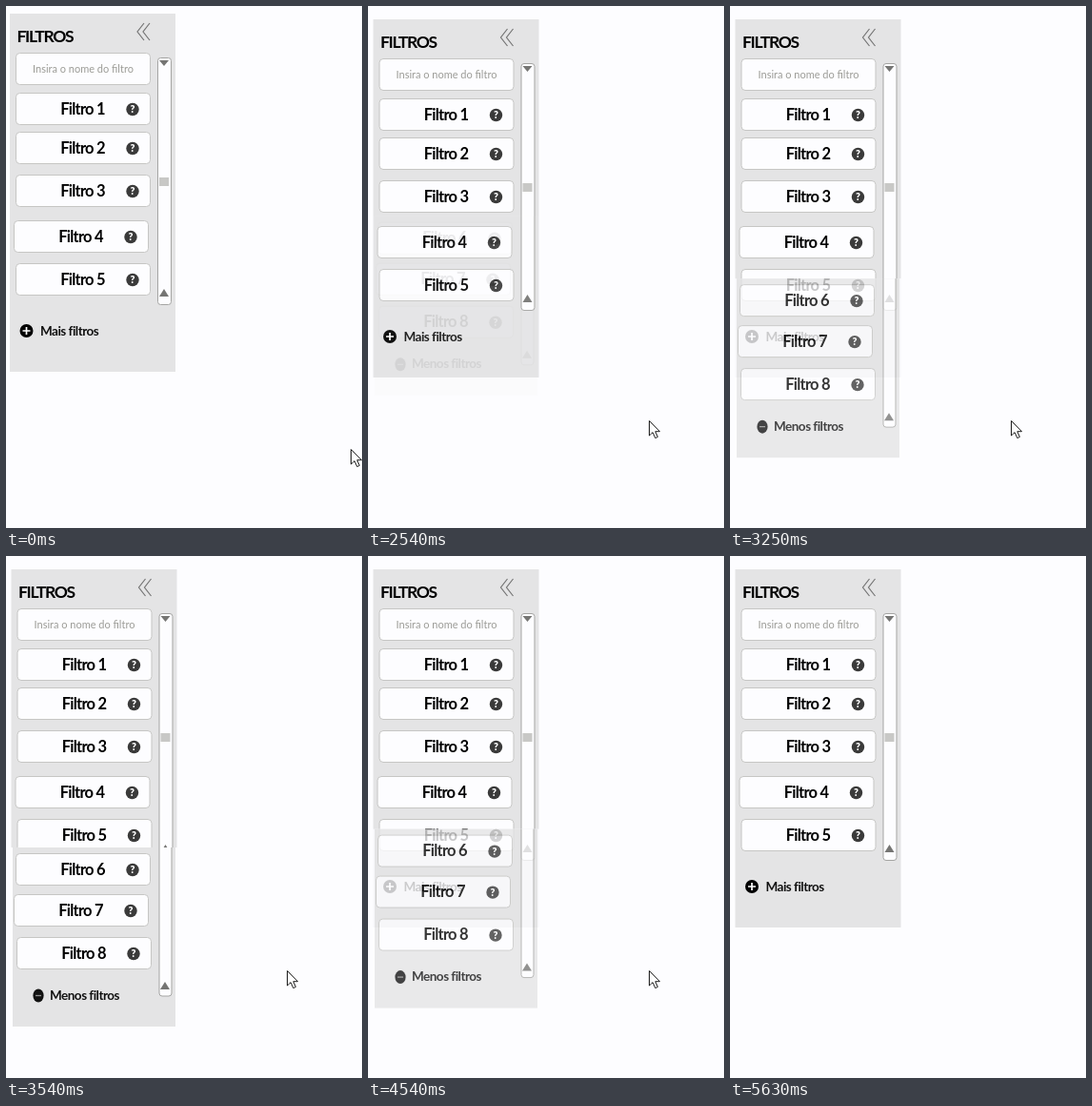
An HTML page for the animation above (7.04 s loop, 374 by 548 pixels).

```html
<!DOCTYPE html>
<html lang="pt">
<head>
<meta charset="utf-8">
<style>
  html, body { margin: 0; width: 100%; height: 100%; overflow: hidden; background: #fdfdff; }
  svg { display: block; width: 374px; height: 548px; font-family: Lato, "Open Sans", sans-serif; }
  text { font-weight: 700; }
  .paper { fill: #fdfdff; }
  .panel { fill: #e4e4e5; }
  .box { fill: #fdfdff; stroke: #c6c6c4; }
  .label { font-size: 16.5px; letter-spacing: -.75px; text-anchor: middle; }
  .title { font-size: 17.5px; letter-spacing: -1.3px; }
  .hint { font-weight: 400; font-size: 11px; fill: #9b9b96; }
  .link { font-size: 13.5px; letter-spacing: -.5px; fill: #111; }
  .help { fill: #3a3a3a; }
  .mark { font-weight: 900; font-size: 10.5px; fill: #fff; text-anchor: middle; }
  .bar { fill: #fdfdff; stroke: #a5a5a3; }
  .arrow { fill: #757573; }
  .chevron { fill: none; stroke: #757575; stroke-width: 1.2; }
</style>
</head>
<body>
<svg viewBox="0 0 374 548">
  <g id="main">
    <rect class="panel" x="4" y="8" width="174" height="376"/>
    <text class="title" x="11.5" y="37.5">FILTROS</text>
    <path class="chevron" d="M145 18l-7 9 7 9M151 18l-7 9 7 9"/>
    <rect class="box" x="10.5" y="49.5" width="141" height="33" rx="4"/>
    <text class="hint" x="28" y="70">Insira o nome do filtro</text>
    <rect class="bar" x="159.5" y="54.5" width="14" height="259" rx="3"/>
    <path class="arrow" d="M161 57h10l-5 6zM161 305h10l-5-8z"/>
    <rect x="161" y="180" width="10" height="9" fill="#c8c8c6"/>
    <circle cx="21.5" cy="341" r="7"/>
    <path d="M17.5 341h8m-4-4v8" stroke="#fff" stroke-width="1.7"/>
    <text class="link" x="36" y="345.5">Mais filtros</text>
  </g>
  <g id="extra">
    <rect class="paper" x="4" y="306" width="177" height="190"/>
    <rect class="panel" x="7" y="306" width="171" height="188"/>
    <path class="bar" d="M161 306V459q0 3 3 3h7q3 0 3-3V306"/>
    <path class="arrow" d="M162 455h10l-5-8z"/>
    <ellipse cx="34" cy="461.5" rx="5.6" ry="7" fill="#111"/>
    <path d="M31 461.5h6" stroke="#8d8d8d" stroke-width="1.3"/>
    <text class="link" x="46" y="465.5">Menos filtros</text>
  </g>
  <path id="cursor" d="M.5.5V16l3.6-3.4 2.7 6 2.6-1.2-2.6-5.7H11.5z" fill="#fff" stroke="#1c1c1c"/>
</svg>
<script>
const LOOP = 7040;
const FLOAT_TIME = 1000, FLOAT_DISTANCE = 92;
const OPEN = 2467, CLOSE = 4330;

const [main, extra, cursor] = ['main', 'extra', 'cursor'].map(id => document.getElementById(id));
const progress = (t, from, length) => Math.min(1, Math.max(0, (t - from) / length));
const move = (el, x, y) => el.setAttribute('transform', `translate(${x} ${y})`);

// Each filter is the same button, placed by its centre.
function addFilters(group, first, centres) {
  centres.forEach(([x, y], i) => group.insertAdjacentHTML('beforeend', `
    <rect class="box" x="${x - 70.5}" y="${y - 16.5}" width="141" height="33" rx="4"/>
    <text class="label" x="${x - .5}" y="${y + 5.7}">Filtro ${first + i}</text>
    <circle class="help" cx="${x + 52}" cy="${y + .5}" r="6.7"/>
    <text class="mark" x="${x + 52}" y="${y + 4.3}">?</text>`));
}
addFilters(main, 1, [[81, 108], [81, 149], [81, 194], [79, 242], [81, 287]]);
addFilters(extra, 6, [[81, 329], [79, 372], [82, 417]]);

function draw(t) {
  const opened = t >= 2500;
  move(main, opened ? 1.5 : 0, opened ? 6 : 0);

  // The extra filters float down while fading in, later float up while fading out.
  const shown = progress(t, OPEN, FLOAT_TIME) - progress(t, CLOSE, FLOAT_TIME);
  move(extra, 0, FLOAT_DISTANCE * (shown - 1));
  extra.setAttribute('opacity', opened ? shown : 0);

  const left = t < 1790 ? 1 : 1 - progress(t, 1750, 330);
  move(cursor, 295 + 67 * left ** 4.2, 435 + 30 * left ** 2.4);
  cursor.setAttribute('visibility', t < 4560 ? 'visible' : 'hidden');
}

const start = performance.now();
function tick() {
  draw((performance.now() - start) % LOOP);
  requestAnimationFrame(tick);
}
tick();
</script>
</body>
</html>
```
